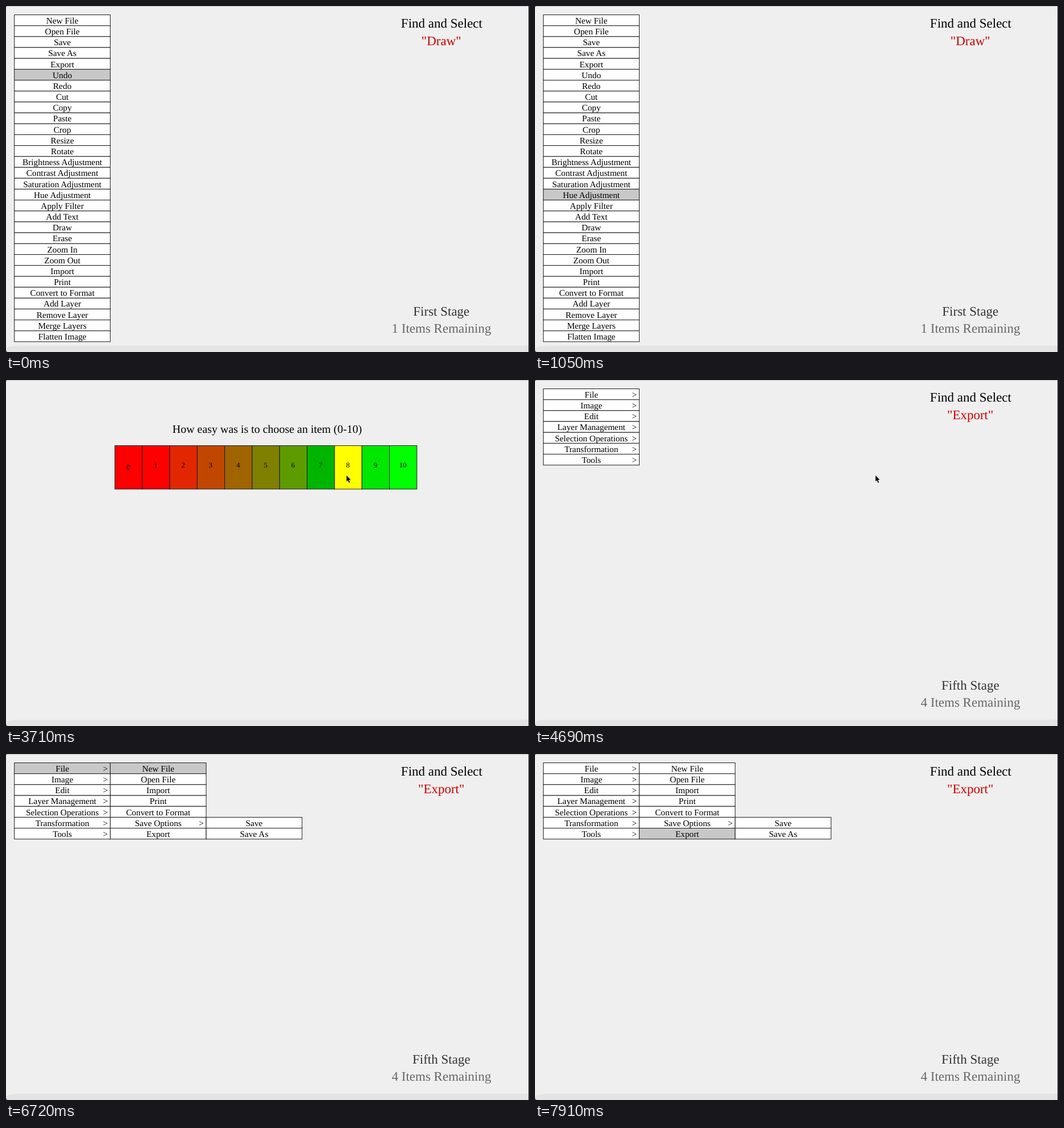
An HTML page with a canvas that plays this animation: 920x609 px, repeating every 8 s.

```html
<!DOCTYPE html>
<html lang="en">
<head>
<meta charset="utf-8">
<title>Menu selection test</title>
<style>
html, body { margin: 0; width: 100%; height: 100%; overflow: hidden; background: #efefef; }
canvas { display: block; width: 920px; height: 609px; }
</style>
</head>
<body>
<canvas id="stage"></canvas>
<script>
const LOOP = 8000, TICK = 70, ROW = 19.18, CELL = 168.7, SCORE_W = 48.3, SCORE_X = 191.5;
const canvas = document.getElementById('stage');
const dpr = window.devicePixelRatio || 1;
canvas.width = 920 * dpr;
canvas.height = 609 * dpr;
const ctx = canvas.getContext('2d');
ctx.scale(dpr, dpr);
ctx.textRendering = 'geometricPrecision';
ctx.textAlign = 'center';

const FLAT = ['New File', 'Open File', 'Save', 'Save As', 'Export', 'Undo', 'Redo', 'Cut', 'Copy', 'Paste',
  'Crop', 'Resize', 'Rotate', 'Brightness Adjustment', 'Contrast Adjustment', 'Saturation Adjustment',
  'Hue Adjustment', 'Apply Filter', 'Add Text', 'Draw', 'Erase', 'Zoom In', 'Zoom Out', 'Import', 'Print',
  'Convert to Format', 'Add Layer', 'Remove Layer', 'Merge Layers', 'Flatten Image'];

// A trailing ">" marks an item with a submenu; nested lists start at the row that opens them
const ROOT = ['File>', 'Image>', 'Edit>', 'Layer Management>', 'Selection Operations>', 'Transformation>', 'Tools>'];
const SUBMENUS = [
  { items: ['New File', 'Open File', 'Import', 'Print', 'Convert to Format', 'Save Options>', 'Export'],
    nestedRow: 5, nested: ['Save', 'Save As'] },
  { items: ['Adjustments>', 'Apply Filter'],
    nestedRow: 1, nested: FLAT.filter(s => s.endsWith('Adjustment')) },
  { items: ['Modifications>', 'Clipboard>', 'Undo', 'Redo'],
    nestedRow: 3, nested: ['Copy', 'Cut', 'Paste'] }
];

// Linear motion through [time, value] points, held before the first and after the last
function along(t, points) {
  const next = points.findIndex(p => p[0] > t);
  if (next < 0) return points[points.length - 1][1];
  if (!next) return points[0][1];
  const [t0, a] = points[next - 1], [t1, b] = points[next];
  return a + (b - a) * (t - t0) / (t1 - t0);
}

const flatRow = t => Math.round(along(t,
  [[140, 5], [350, 8], [490, 8], [700, 15], [980, 15], [1050, 16], [1260, 16], [1610, 19]]));
const fileRow = t => Math.round(along(t,
  [[6930, 0], [7210, 3], [7560, 3], [7700, 5], [7840, 5], [7910, 6]]));
const rootRow = t => 2 - (t >= 6090) - (t >= 6370);

function pointer(t) {
  if (t >= 2240 && t < 2590) return [127, 385];
  if (t < 2730 || t >= 4830) return null;
  return [along(t, [[3010, 476], [3150, 602], [3640, 602], [3710, 599]]),
    along(t, [[3010, 181], [3150, 171], [3640, 171], [3710, 168]])];
}

function text(str, x, y, size, color = '#000') {
  ctx.font = size + 'px "Liberation Serif", "Times New Roman", serif';
  ctx.fillStyle = color;
  ctx.fillText(str, x, y);
}

function box(x, y, w, h, fill) {
  ctx.fillStyle = fill;
  ctx.fillRect(x, y, w, h);
  ctx.strokeStyle = '#1a1a1a';
  ctx.lineWidth = 1;
  ctx.strokeRect(x, y, w, h);
}

function column(col, first, items, hover) {
  const x = 14.7 + CELL * col;
  items.forEach((item, i) => {
    const y = 15.5 + ROW * (first + i);
    box(x, y, CELL, ROW, first + i === hover ? '#c8c8c8' : '#fff');
    text(item.replace('>', ''), x + CELL / 2, y + 15.3, 15.34);
    if (item.endsWith('>')) text('>', x + CELL - 8.5, y + 15.3, 15.34);
  });
}

function labels(target, stage, left) {
  text('Find and Select', 766.4, 38.2, 23);
  text(`"${target}"`, 765.7, 69.2, 23, '#c00');
  text(stage + ' Stage', 765.8, 545, 23, '#333');
  text(left + ' Items Remaining', 766, 575.4, 23, '#666');
}

function survey(pos) {
  const chosen = pos && Math.floor((pos[0] - SCORE_X) / SCORE_W);
  text('How easy was is to choose an item (0-10)', 459.5, 92.5, 19.95);
  for (let i = 0; i <= 10; i++) {
    const x = SCORE_X + SCORE_W * i;
    const red = i < 7 ? 292 - 33 * i : 0;
    const green = 255 * (Math.max(0, i - 1) / 9) ** 0.85;
    box(x, 115.5, SCORE_W, 76.5, i === chosen ? '#ff0' : `rgb(${red}, ${green}, 0)`);
    text(i, x + SCORE_W / 2 - 0.5, i ? 153.6 : 158.4, 12.8);
  }
}

function drawPointer([x, y]) {
  const arrow = new Path2D(`M${x} ${y}v10.6l2.4 -2.2 2 4.6 1.7 -0.8 -2 -4.4h3.4z`);
  ctx.strokeStyle = 'rgba(255,255,255,.6)';
  ctx.stroke(arrow);
  ctx.fillStyle = '#000';
  ctx.fill(arrow);
}

function backdrop() {
  ctx.fillStyle = '#efefef';
  ctx.fillRect(0, 0, 920, 609);
  ctx.fillStyle = '#e4e4e4';
  ctx.fill(new Path2D('M0 603Q5 598 22 598H920V609H0z'));
  ctx.fillStyle = '#c4c4c4';
  ctx.fillRect(0, 0, 920, 1);
  ctx.fillStyle = '#333';
  ctx.fillRect(919, 0, 1, 609);
  ctx.fill(new Path2D('M0 0h3Q0 0 0 3zM0 609v-4Q0 609 4 609z'));
}

function menus(t) {
  const row = rootRow(t);
  column(0, 0, ROOT, t >= 5250 && t < 6790 ? row : -1);
  if (t >= 5250) {
    const { items, nestedRow, nested } = SUBMENUS[row];
    column(1, row, items, t >= 6720 ? fileRow(t) : -1);
    column(2, nestedRow, nested, -1);
  }
  labels('Export', 'Fifth', 4);
}

function draw(t) {
  const pos = pointer(t);
  backdrop();
  if (t < 1960) {
    column(0, 0, FLAT, flatRow(t));
    labels('Draw', 'First', 1);
  } else if (t < 4270) {
    survey(pos);
  } else {
    menus(t);
  }
  if (pos) drawPointer(pos);
}

const start = performance.now();
function frame() {
  const t = (performance.now() - start) % LOOP;
  draw(Math.floor(t / TICK) * TICK);
  requestAnimationFrame(frame);
}
frame();
</script>
</body>
</html>
```
